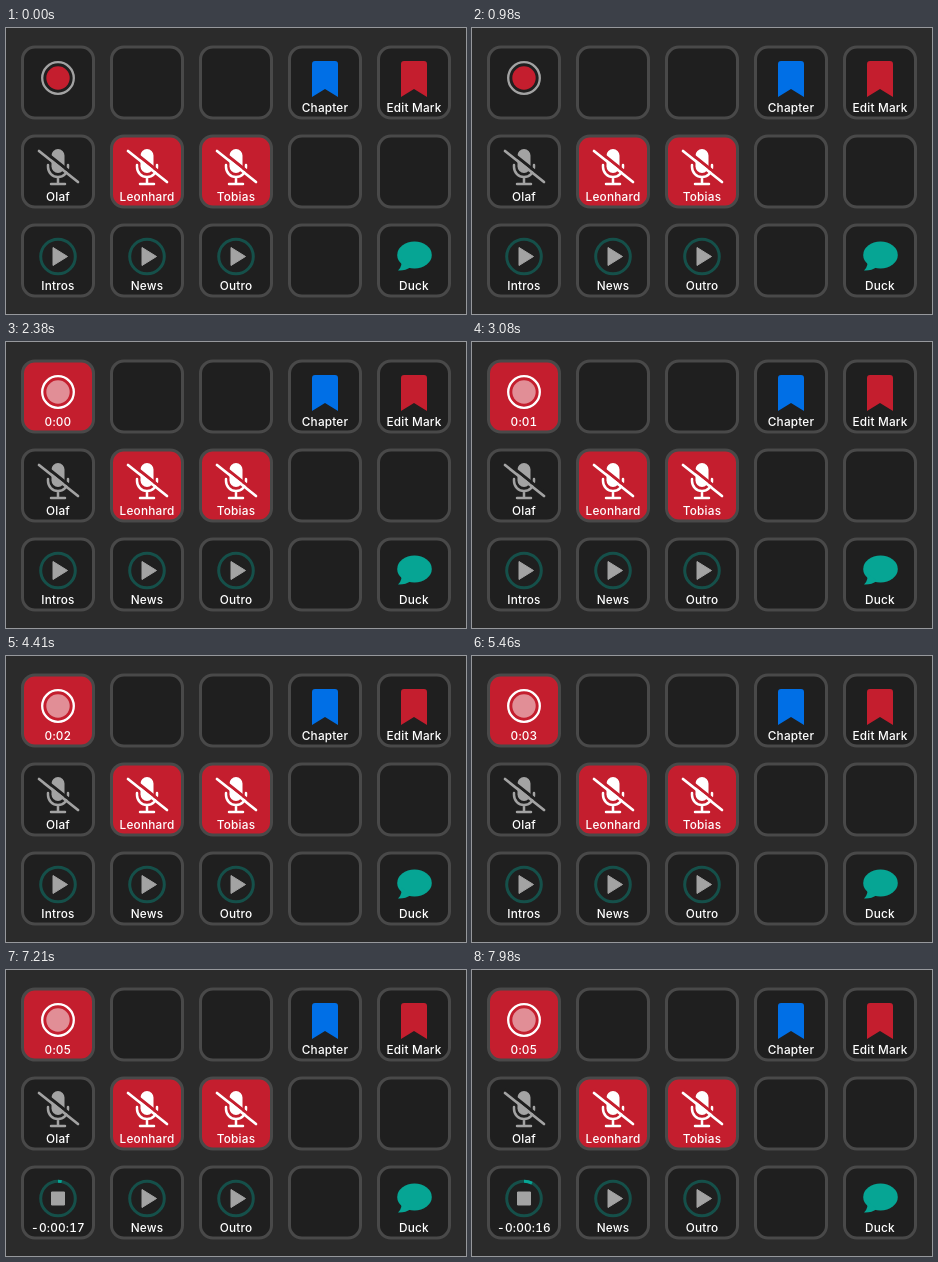
Recreate the animation shown at these times as an HTML page. Size 460 by 286 pixels, loop 8 s.

```html
<!DOCTYPE html>
<html lang="en">
<head>
<meta charset="utf-8">
<style>
  html, body { margin: 0; width: 100%; height: 100%; overflow: hidden; background: #2b2b2b; }
  svg { display: block; }
  text {
    font: 500 11.8px Inter, "Open Sans", sans-serif;
    font-feature-settings: "tnum";
    letter-spacing: .2px;
    text-anchor: middle;
    fill: #fff;
  }
</style>
</head>
<body>
<svg id="deck" width="460" height="286" viewBox="0 0 460 286"></svg>
<script>
const LOOP = 8000;
const REC_ON = 1400, COUNT_FROM = 2030;      // button lights up, then the clock runs
const CLIP_ON = 6600, CLIP_LENGTH = 18000;   // intro clip playback
const RED = '#c41e2e', DARK = '#1f1f1f', GREY = '#a3a3a3', TEAL = '#06a594';

const bookmark = color =>
  `<path fill="${color}" d="M-13-18q0-3 3-3H10q3 0 3 3V15L0 7-13 15Z"/>`;

const mic = (color, back) => `
  <g fill="none" stroke="${color}" stroke-linecap="round">
    <rect x="-6.5" y="-22" width="13" height="24" rx="6.5" fill="${color}" stroke="none"/>
    <path stroke-width="2.5" d="M-10-6V-4a10 10 0 0 0 20 0V-6M0 6V13M-7 13H7"/>
    <path stroke="${back}" stroke-width="3" d="M-18-23 22 9"/>
    <path stroke-width="2.7" d="M-19-20 20 11"/>
  </g>`;

const clip = `
  <g transform="translate(0 -3.5)">
    <circle r="17.3" fill="none" stroke="#15504a" stroke-width="3"/>
    <path class="sweep" fill="none" stroke="${TEAL}" stroke-width="3"/>
    <path class="symbol" fill="${GREY}" stroke="${GREY}" stroke-linejoin="round"/>
  </g>`;

const record = `
  <circle class="ring" cy="-4" r="15.8" fill="none" stroke-width="2.3"/>
  <circle class="dot" cy="-4" r="11.7"/>`;

const bubble = `
  <g fill="${TEAL}">
    <ellipse cx=".5" cy="-5" rx="17.3" ry="13.5"/>
    <path d="M-13-1Q-11 6-16 10.5-9 11-3 7Z"/>
  </g>`;

// id: [column, row, label, icon, background]
const keys = {
  rec: [0, 0, '', record],
  chapter: [3, 0, 'Chapter', bookmark('#006fe6')],
  edit: [4, 0, 'Edit Mark', bookmark(RED)],
  mic1: [0, 1, 'Olaf', mic(GREY, DARK)],
  mic2: [1, 1, 'Leonhard', mic('#fff', RED), RED],
  mic3: [2, 1, 'Tobias', mic('#fff', RED), RED],
  intros: [0, 2, 'Intros', clip],
  news: [1, 2, 'News', clip],
  outro: [2, 2, 'Outro', clip],
  duck: [4, 2, 'Duck', bubble]
};
const blanks = [[1, 0], [2, 0], [3, 1], [4, 1], [3, 2]];

const drawKey = ([col, row, label = '', icon = '', back = DARK], id = '') => `
  <g ${id && `id="${id}"`} transform="translate(${52 + col * 89} ${54 + row * 89})">
    <rect class="back" x="-35.5" y="-35" width="71" height="71" rx="12.5"
      fill="${back}" stroke="#494949" stroke-width="3"/>
    ${icon}<text y="29.5">${label}</text>
  </g>`;

const deck = document.getElementById('deck');
deck.innerHTML = blanks.map(k => drawKey(k)).join('') +
  Object.entries(keys).map(([id, k]) => drawKey(k, id)).join('');

const part = (id, selector) => deck.querySelector(`#${id} ${selector}`);

function drawRecord(t) {
  const on = t >= REC_ON;
  part('rec', '.back').setAttribute('fill', on ? RED : DARK);
  part('rec', '.ring').setAttribute('stroke', on ? '#fff' : GREY);
  part('rec', '.dot').setAttribute('fill', on ? '#e18e96' : RED);
  const seconds = Math.floor((t - COUNT_FROM) / 1000);
  part('rec', 'text').textContent = seconds >= 0 ? `0:0${seconds}` : '';
}

function drawClip(id, elapsed) {
  const playing = elapsed >= 0;
  const angle = Math.max(elapsed, 0) / CLIP_LENGTH * 2 * Math.PI;
  const x = 17.3 * Math.sin(angle), y = -17.3 * Math.cos(angle);
  part(id, '.sweep').setAttribute('d', playing ? `M0-17.3A17.3 17.3 0 0 1 ${x} ${y}` : '');
  part(id, '.symbol').setAttribute('d', playing ? 'M-6.5-6.5H6.5V6.5H-6.5Z' : 'M-5-9 9.5 0-5 9Z');
  const left = Math.floor((CLIP_LENGTH - 1 - elapsed) / 1000);
  part(id, 'text').textContent = playing ? `-0:00:${left}` : keys[id][2];
}

function frame(now) {
  const t = now % LOOP;
  drawRecord(t);
  drawClip('intros', t - CLIP_ON);
  drawClip('news', -1);
  drawClip('outro', -1);
  requestAnimationFrame(frame);
}
frame(performance.now());
</script>
</body>
</html>
```
